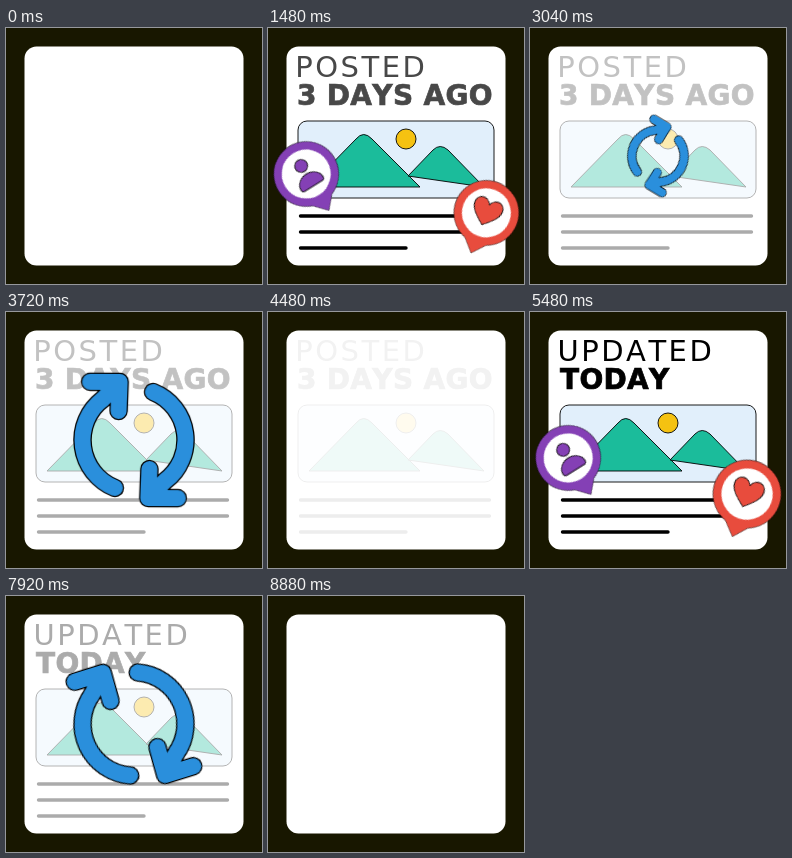
Recreate the animation shown at these times as an HTML page. Size 256 px wide and 256 px high, loop 8.92 s.

```html
<!DOCTYPE html>
<html lang="en">
<head>
<meta charset="utf-8">
<title>Post refresh</title>
<style>
  html, body { margin: 0; width: 100%; height: 100%; overflow: hidden; background: #181700; }
  svg { display: block; width: 100vw; height: 100vh; }
  text { font: 29px "DejaVu Sans", sans-serif; letter-spacing: 2.5px; font-kerning: none; }
  .heavy { font-size: 28px; font-weight: 700; letter-spacing: .3px; stroke-width: .7; }
  .ink { stroke: #000; stroke-width: .9; stroke-linejoin: round; }
  .lines { stroke: #000; stroke-width: 3.4; stroke-linecap: round; }
  .arrow { fill: none; stroke-linecap: round; stroke-linejoin: round; }
</style>
</head>
<body>
<svg viewBox="0 0 256 256">
  <defs>
    <g id="pin">
      <path d="M0 0L-11.300-12.500A32.500 32.500 0 1 1 11.300-12.500Z" stroke="#000" stroke-width=".5"/>
      <circle cy="-43" r="24.500" fill="#fff"/>
    </g>
    <path id="turn" class="arrow" d="M-19 48A51.5 51.5 0 0 1-31-41L-14.500-58M-44-58H-14.500L-15.500-29"/>
    <g id="pair">
      <use href="#turn"/>
      <use href="#turn" transform="rotate(180)"/>
    </g>
  </defs>

  <rect x="18.500" y="18.500" width="219" height="219" rx="12" fill="#fff"/>

  <g id="page" opacity="0">
    <g id="before" fill="#484848" stroke="#484848" stroke-width="0">
      <text x="27.300" y="49">POSTED</text>
      <text class="heavy" x="29" y="77">3 DAYS AGO</text>
    </g>
    <g id="after" opacity="0" stroke="#000" stroke-width="0">
      <text x="27.500" y="49">UPDATED</text>
      <text class="heavy" x="30" y="77">TODAY</text>
    </g>

    <g class="ink">
      <rect x="30" y="93" width="196" height="77" rx="9" fill="#e1effb"/>
      <circle cx="138" cy="111" r="10" fill="#f5c211"/>
      <g fill="#1bbc9b">
        <path d="M41 159L88 111Q95.500 102 104 111L152 159Z"/>
        <path d="M140 148L165 122Q172 115 180 122L216 159Z"/>
      </g>
    </g>
    <path class="lines" d="M32.500 188H221.500M32.500 204H221.500M32.500 220H138"/>

    <g id="user" fill="#8440b5">
      <use href="#pin"/>
      <g class="ink" transform="translate(0 -43)">
        <circle cy="-9.500" r="6.500"/>
        <path d="M-11 14Q-13 14-13 11C-13 4-6 0 0 0S13 4 13 11Q13 14 11 14Z"/>
      </g>
    </g>

    <g id="like" fill="#e84c3d">
      <use href="#pin"/>
      <path class="ink" transform="translate(0 -44) scale(1.05)"
        d="M0 13C-6 8-14 2-14-5C-14-14-3-15 0-7C3-15 14-14 14-5C14 2 6 8 0 13Z"/>
    </g>
  </g>

  <g transform="translate(128 128)">
    <g id="spin">
      <g id="arrows">
        <use href="#pair" stroke="#000" stroke-width="18.500"/>
        <use href="#pair" stroke="#2a8fdc" stroke-width="16"/>
      </g>
    </g>
  </g>
</svg>

<script>
  const LOOP = 8920;
  const IN = 4680;   // delay of the second entrance
  const OUT = 4280;  // delay of the second exit

  // steps: [time in ms, value]; first and last values are held to the loop's ends
  function play(id, prop, steps, easing = "linear") {
    const all = [[0, steps[0][1]], ...steps, [LOOP, steps.at(-1)[1]]];
    const frames = all.map(([t, v]) => ({ offset: t / LOOP, [prop]: v, easing }));
    document.getElementById(id).animate(frames, { duration: LOOP, iterations: Infinity });
  }

  const later = (steps, d) => steps.map(([t, v]) => [t + d, v]);
  const twice = (enter, exit) =>
    [...enter, ...exit, ...later(enter, IN), ...later(exit, OUT)];

  play("page", "opacity", twice(
    [[0, 0], [400, 1]],
    [[2620, 1], [2900, .33], [4100, .33], [4590, 0]]
  ));
  play("before", "opacity", [[4640, 1], [4640, 0]]);
  play("after", "opacity", [[4640, 0], [4640, 1]]);

  // Bubbles swing open and shut near the tips of their tails
  function bubble(id, x, y, angle, drift, start, sway) {
    const side = Math.sign(angle);
    const pose = (turn, scale) => {
      const shrink = 1 - scale;
      const dx = x + side * 13 * shrink;
      const dy = y + 6 * shrink;
      return `translate(${dx}px, ${dy}px) rotate(${turn}deg) scale(${scale})`;
    };
    const shut = pose(angle + side * 35, 0);
    const rest = pose(angle, 1);
    const swayed = pose(angle + sway, 1);
    play(id, "transform", twice(
      [[start, shut], [start + 380, pose(angle + drift, 1.05)], [start + 620, rest], [1480, rest]],
      [[2140, swayed], [2580, swayed], [2940, shut]]
    ), "ease-in-out");
  }
  bubble("user", 61, 182.5, -32, 0, 220, -2);
  bubble("like", 203, 225, 21, -2, 400, -.5);

  const turn = [[2900, "rotate(0deg)"], [4540, "rotate(360deg)"]];
  play("spin", "transform", [...turn, ...later(turn, OUT)]);

  const grow = [[2900, "scale(0)"], [3180, "scale(1)"], [4120, "scale(1)"], [4460, "scale(0)"]];
  play("arrows", "transform", [...grow, ...later(grow, OUT)], "ease-in-out");
</script>
</body>
</html>
```
